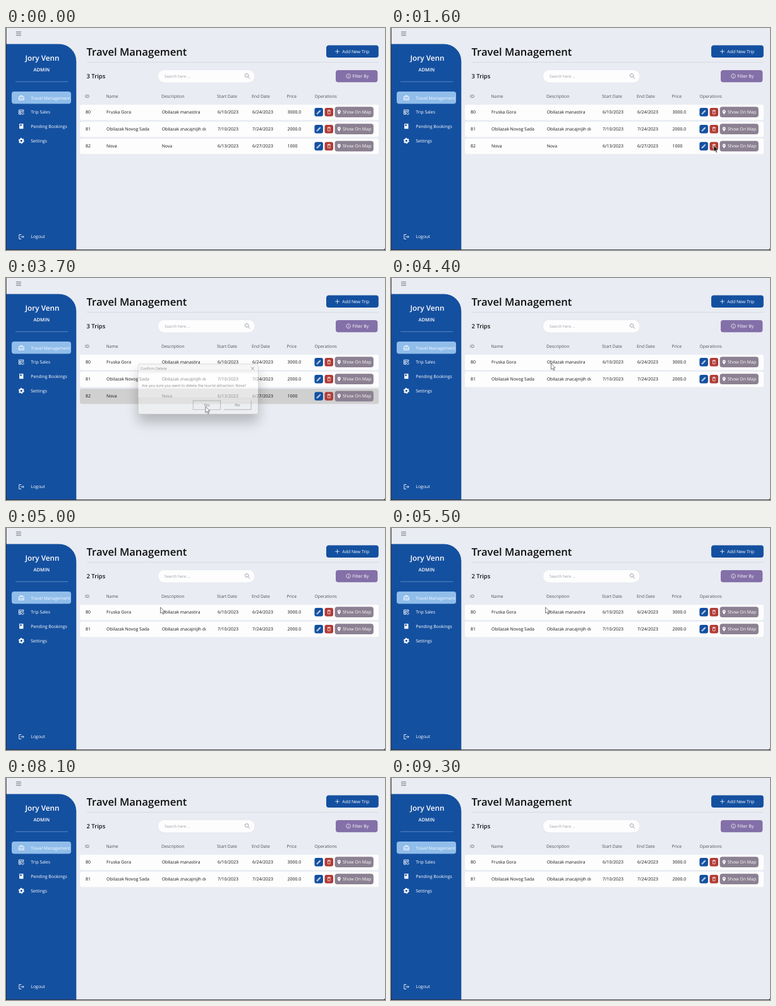
Animation of 600 by 353 pixels, one loop 9.4 s. Source, as an HTML page:

```html
<!DOCTYPE html>
<html lang="en">
<head>
<meta charset="utf-8">
<title>Travel Management</title>
<style>
html, body { margin: 0; width: 100%; height: 100%; overflow: hidden; background: #e9ecf2; }
svg { display: block; }
text { font-family: "Open Sans", "Noto Sans", sans-serif; text-rendering: geometricPrecision; white-space: pre; }
#dialog { filter: drop-shadow(0 13px 10px rgba(0, 0, 0, .45)); transform-origin: 304px 176px; }
</style>
</head>
<body>
<svg id="stage" width="600" height="353" viewBox="0 0 600 353"></svg>
<script>
const LOOP = 9400, BLUE = '#1450a0', RED = '#b13c37', INK = '#141416';

const ICONS = {
  menu: 'M2 5h20M2 12h20M2 19h20',
  plus: 'M12 3v18M3 12h18',
  info: 'M12 3a9 9 0 1 0 .01 0M12 11v6M12 7v1.5',
  search: 'M9.5 3.5a6 6 0 1 0 .01 0M14 14l6.5 6.5',
  suitcase: 'M3 8h18v12H3zM8 8V4h8v4M3 15h18',
  sales: 'M11 20H3V4h17v6M3 9h17M3 14h7M9 9v11M17 13a4 4 0 1 0 .01 0',
  book: 'M4 2h16v20H4zM7 4v8l3-2 3 2V4z',
  logout: 'M12 4H4v16h8M9 12h12M17 8l4 4-4 4',
  pencil: 'M3 17v4h4L18 10l-4-4zM5 18l9-9 1 1-9 9H5zM21 7l-4-4-2 2 4 4z',
  trash: 'M7 7h10v13H7zM4 5h16M9 3h6',
  pin: 'M12 2a7 7 0 0 0-7 7c0 5 7 13 7 13s7-8 7-13a7 7 0 0 0-7-7zm0 9.5a2.5 2.5 0 1 1 0-5 2.5 2.5 0 0 1 0 5z'
};

const rect = (x, y, w, h, fill, r = 0, extra = '') =>
  `<rect x="${x}" y="${y}" width="${w}" height="${h}" rx="${r}" fill="${fill}" ${extra}/>`;
const text = (x, y, s, size = 6.95, fill = INK, extra = '') =>
  `<text x="${x}" y="${y}" font-size="${size}" fill="${fill}" ${extra}>${s}</text>`;
const line = (d, color, width = 1) =>
  `<path d="${d}" fill="none" stroke="${color}" stroke-width="${width}"/>`;
// Icons are drawn on a 24-unit grid, centred on x, y.
const icon = (name, x, y, size, color = '#fff', solid = false) =>
  `<path d="${ICONS[name]}" transform="translate(${x - size / 2} ${y - size / 2}) scale(${size / 24})" ` +
  (solid ? `fill="${color}" fill-rule="evenodd"/>` : `fill="none" stroke="${color}" stroke-width="2"/>`);

function sidebar() {
  const gear = `<g fill="none" stroke="#fff"><circle cx="24.3" cy="179.3" r="2.6" stroke-width="2"/>
    <circle cx="24.3" cy="179.3" r="3.9" stroke-width="1.3" stroke-dasharray="2.3 1.784"/></g>`;
  return `<path d="M0 25.4H84A27.3 27.3 0 0 1 111.3 52.7V353H0z" fill="${BLUE}"/>` +
    text(57.5, 52, 'Jory Venn', 11.8, '#fff', 'font-weight="600" text-anchor="middle"') +
    text(56.3, 69.2, 'ADMIN', 7.5, '#fff', 'font-weight="600" text-anchor="middle"') +
    line('M15 85.3H98', '#6f94c8', .8) +
    rect(9, 101, 94, 19.5, '#90bdea', 4) +
    `<svg x="9" y="101" width="93.5" height="20" viewBox="9 101 93.5 20">${text(39.3, 113.5, 'Travel Management', 6.75, '#f6faff')}</svg>` +
    text(39.3, 136, 'Trip Sales', 6.95, '#fff') +
    text(39.3, 158.7, 'Pending Bookings', 6.9, '#fff') +
    text(39.3, 181.5, 'Settings', 6.95, '#fff') +
    text(39.3, 334.4, 'Logout', 6.95, '#fff') +
    icon('suitcase', 24.3, 111, 10.5) + icon('sales', 24.3, 133.7, 10.5) +
    icon('book', 24.3, 156.3, 9.5, '#fff', true) + gear + icon('logout', 24.3, 332, 10.5);
}

function header() {
  const labels = [[125, 'ID'], [158.5, 'Name'], [246, 'Description'], [334, 'Start Date'],
    [389, 'End Date'], [444.5, 'Price'], [488.5, 'Operations']];
  return icon('menu', 20, 9, 9.5, '#555') +
    text(127.5, 44.2, 'Travel Management', 16.6, '#0c0c0e', 'font-weight="600"') +
    line('M128 54.5H590', '#d3d8e0', .8) +
    rect(507, 27.6, 82.8, 19.4, BLUE, 4) + icon('plus', 524.5, 37.3, 9) + text(532.3, 39.8, 'Add New Trip', 6.9, '#fff') +
    rect(522, 67, 66.3, 19.3, '#8470a8', 4) + icon('info', 542, 76.5, 9) + text(548.3, 79, 'Filter By', 6.95, '#fff') +
    text(127.5, 80.4, '<tspan id="count"></tspan> Trips', 9.4, INK, 'font-weight="600"') +
    rect(240.5, 66.3, 153.5, 20.7, '#fdfdfe', 10.3, 'stroke="#dfe3e9" stroke-width=".7"') +
    text(251, 79, 'Search here ...', 6.2, '#9b9fa6') + icon('search', 382.2, 76.6, 11, '#8d9096') +
    labels.map(([x, s]) => text(x, 111.2, s, 6.8, '#4c5058')).join('');
}

function row(y, id, name, about, start, end, price) {
  const cells = [[126, id], [159, name], [335, start], [390, end], [445.5, price]];
  const base = y + 14.4;
  return `<g id="row${id}">` + rect(117, y, 473, 24.3, '#fdfdfd', 3) +
    cells.map(([x, s]) => text(x, base, s)).join('') +
    `<svg x="246" y="${y}" width="70.5" height="24" viewBox="246 ${y} 70.5 24">${text(246.7, base, about, 6.8)}</svg>` +
    rect(488.4, y + 5.2, 13.5, 13.5, BLUE, 3) + icon('pencil', 495.1, y + 11.9, 9, '#fff', true) +
    rect(504.5, y + 5.2, 13.5, 13.5, RED, 3) + icon('trash', 511.3, y + 11.9, 8.5) +
    rect(520.5, y + 3.4, 61.3, 16.8, '#8b8192', 4) + icon('pin', 527.3, y + 11.8, 8.5, '#fff', true) +
    text(533, base, 'Show On Map', 6.95, '#fff') + '</g>';
}

function dialog() {
  return '<g id="dialog">' + rect(207, 136, 194.5, 81.5, '#f0f0f0', 3, 'stroke="#8d8d8d" stroke-width=".6"') +
    rect(207.3, 151, 193.9, 39, '#fff') +
    text(210.5, 145.7, 'Confirm Delete', 6.1, '#222') +
    '<path id="close" d="M390 140.6l5 5M395 140.6l-5 5" stroke-width=".8"/>' +
    text(213, 172.8, 'Are you sure you want to delete the tourist attraction: Nova?', 6.02, '#111') +
    rect(296, 195.5, 44.3, 14.5, '#f1f1f1', 0, 'stroke="#7a7a7a" stroke-width=".8"') +
    line('M345.5 210V195.5H390', '#fff', .8) + line('M345.5 210H390V195.5', '#777', .9) +
    text(318.2, 205, 'Yes', 6.1, '#111', 'text-anchor="middle"') +
    text(367.8, 205, 'No', 6.1, '#111', 'text-anchor="middle"') + '</g>';
}

const stage = document.getElementById('stage');
stage.innerHTML = rect(0, 0, 600, 353, '#e9ecf2') + sidebar() + header() +
  row(121.9, 80, 'Fruska Gora', 'Obilazak manastira', '6/10/2023', '6/24/2023', '3000.0') +
  row(148.9, 81, 'Obilazak Novog Sada', 'Obilazak znacajnijih delova', '7/10/2023', '7/24/2023', '2000.0') +
  row(176, 82, 'Nova', 'Nova', '6/13/2023', '6/27/2023', '1000') +
  line('M.4 0V353', '#23272e', .8) + line('M0 352.6H600', '#2b2f36', .9) +
  '<path d="M600 349v4h-4q4 0 4-4zM0 349v4h4q-4 0-4-4z" fill="#222"/>' + dialog() +
  '<path id="cursor" d="M0 0v9.6l2.2-2 1.6 3.6 1.6-.7-1.6-3.4h3.1z" stroke-width=".7"/>';

const [count, nova, box, closeMark, cursor] =
  ['count', 'row82', 'dialog', 'close', 'cursor'].map(id => document.getElementById(id));
const novaBack = nova.querySelector('rect');

// Pointer stops: time, x, y
const STOPS = [[600, 430, 360], [1500, 511, 187], [1800, 511, 187], [2300, 455, 193], [3000, 316, 204.5],
  [3700, 316, 204.5], [4500, 244.5, 126], [6500, 244.5, 126], [7000, 385, 29.5], [7200, 420, -14]];

const clamp = v => Math.max(0, Math.min(1, v));

function pointer(t) {
  const i = STOPS.findIndex(s => s[0] > t);
  if (i < 1) return null;
  const [t0, x0, y0] = STOPS[i - 1], [t1, x1, y1] = STOPS[i];
  const k = (t - t0) / (t1 - t0);
  return [x0 + (x1 - x0) * k, y0 + (y1 - y0) * k];
}

function draw(t) {
  const deleted = t >= 4100;
  count.textContent = deleted ? 2 : 3;
  nova.style.display = deleted ? 'none' : '';
  novaBack.setAttribute('fill', t >= 1800 ? '#d0d0d0' : '#fdfdfd');

  const shown = clamp((t - 1700) / 200) * clamp((3800 - t) / 200);
  box.style.display = shown ? '' : 'none';
  box.style.opacity = shown;
  box.style.transform = `scale(${.955 + .045 * shown})`;
  closeMark.setAttribute('stroke', t >= 3600 ? '#111' : '#b5b5b5');

  const at = pointer(t);
  cursor.style.display = at ? '' : 'none';
  if (at) cursor.setAttribute('transform', `translate(${at})`);
  const dark = t < 1800;
  cursor.setAttribute('fill', dark ? '#111' : '#fff');
  cursor.setAttribute('stroke', dark ? '#ddd' : '#444');
}

function tick() {
  draw(Math.floor(performance.now() % LOOP / 100) * 100);
  requestAnimationFrame(tick);
}
tick();
</script>
</body>
</html>
```
